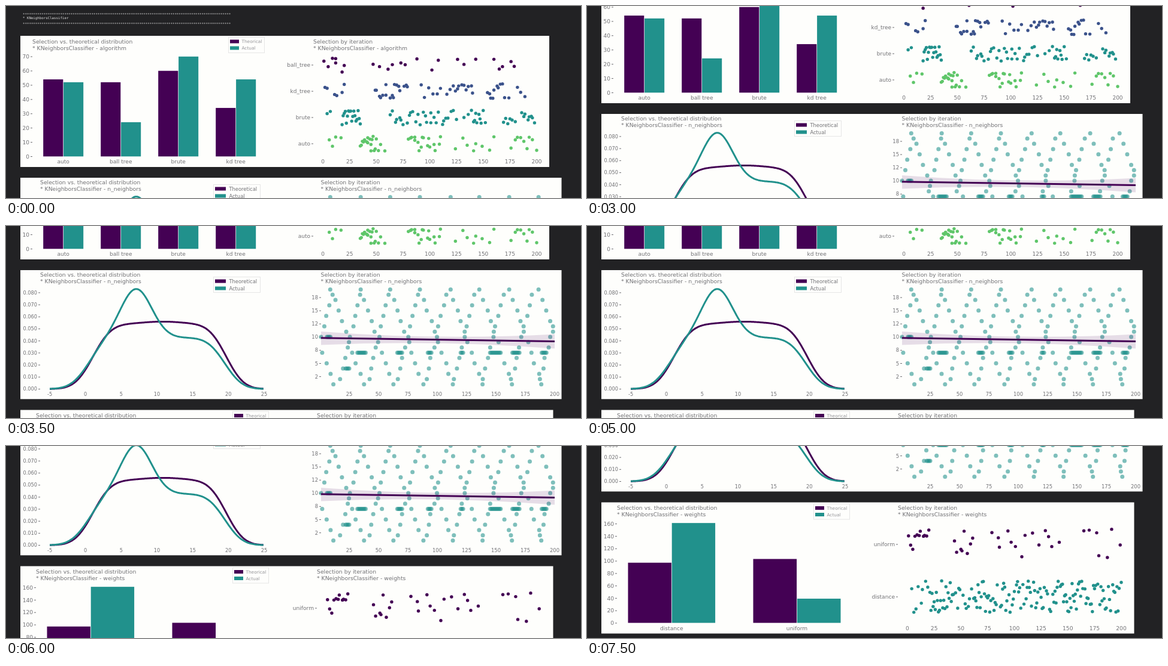
Animation of 960 by 322 pixels, one loop 8000 ms. Source, as an HTML page with a canvas:

```html
<!DOCTYPE html>
<html lang="en">
<head>
<meta charset="utf-8">
<title>Parameter selection report</title>
<style>
  html, body { margin: 0; width: 100%; height: 100%; overflow: hidden; background: #222224; }
  canvas { display: block; }
</style>
</head>
<body>
<canvas id="stage" width="960" height="322"></canvas>
<script>
const ctx = document.getElementById('stage').getContext('2d');
const LOOP = 8000;
const STEP = 107;
const JUMPS = [3000, 3500, 6000, 6500];
const SANS = '"DejaVu Sans", sans-serif';
const MONO = '"DejaVu Sans Mono", monospace';
const PURPLE = '#440154', BLUE = '#3b528b', TEAL = '#21918c', GREEN = '#5fc66a';
const PAPER = '#fefefc', INK = '#707074', FAINT = '#96969a';

function rng(seed) {
  return () => {
    seed = (seed * 1664525 + 1013904223) >>> 0;
    return seed / 4294967296;
  };
}

function rect(x, y, w, h, color) {
  ctx.fillStyle = color;
  ctx.fillRect(x, y, w, h);
}

// y is the middle of the capitals
function label(text, x, y, size, align = 'left', color = INK, font = SANS) {
  ctx.font = `${size}px ${font}`;
  ctx.textAlign = align;
  ctx.fillStyle = color;
  ctx.fillText(text, x, y + size * 0.36);
}

function dot(x, y, r, color) {
  ctx.fillStyle = color;
  ctx.beginPath();
  ctx.arc(x, y, r, 0, Math.PI * 2);
  ctx.fill();
}

// Spreads points over spans of iterations [from, to, count]; returns the iterations used
function scatter(spans, x0, y, spread, color, seed) {
  const rand = rng(seed);
  const used = new Set();
  for (const [from, to, n] of spans) {
    for (let i = 0; i < n; i++) {
      const inner = i > 0 && i < n - 1;
      const pos = i + (inner ? rand() - 0.5 : 0);
      const v = Math.round(from + (to - from) * pos / (n - 1));
      used.add(v);
      dot(x0 + v * 1.785, y + (rand() * 2 - 1) * spread, 2.7, color);
    }
  }
  return used;
}

// Normal distribution function, close approximation
const phi = z => 1 / (1 + Math.exp(-1.5976 * z - 0.07056 * z ** 3));
const bell = (x, mid, s) => Math.exp(-((x - mid) ** 2) / (2 * s * s));
const plateau = (x, from, to) => phi((x - from) / 2) - phi((x - to) / 1.94);
const theory = x => 0.0537 * plateau(x, 1.05, 19.7) + 0.0022 * bell(x, 10.8, 3);
const actual = x => 0.0425 * plateau(x, 0.45, 19.5) + 0.0405 * bell(x, 7.1, 2.17);

function density(f, color) {
  ctx.beginPath();
  for (let x = -5; x <= 25; x += 0.1) ctx.lineTo(132.7 + x * 11.93, 487.3 - f(x) * 2020);
  ctx.strokeStyle = color;
  ctx.lineWidth = 3;
  ctx.stroke();
}

function titles(x, y, name) {
  label('Selection vs. theoretical distribution', x[0], y, 9.27);
  label('Selection by iteration', x[1], y, 9.27);
  for (const left of x) label('* KNeighborsClassifier - ' + name, left, y + 10.7, 9.27);
}

function legend(x, y, w, swatch, gap, size, first, color) {
  ctx.strokeStyle = '#e6e6e6';
  ctx.lineWidth = 1;
  ctx.strokeRect(x + 0.5, y + 0.5, w, 26);
  [[first, PURPLE], ['Actual', TEAL]].forEach(([text, fill], i) => {
    const top = y + 4.5 + i * gap;
    rect(x + 3, top, swatch, 6, fill);
    label(text, x + swatch + size, top + 3, size, 'left', color);
  });
}

function tickY(text, x, y, size) {
  label(text, x - 5, y, size, 'right');
  rect(x - 3, y - 0.5, 3, 1, INK);
}

function ticksX(x0, unit, from, to, by, y, size) {
  for (let v = from; v <= to; v += by) label(v, x0 + v * unit, y, size, 'center');
}

function barPair(name, mid, base, w, unit, left, right) {
  rect(mid - w, base - left * unit, w - 0.4, left * unit, PURPLE);
  rect(mid + 0.4, base - right * unit, w - 0.4, right * unit, TEAL);
  label(name, mid, base + 8.8, 9.1, 'center');
}

function header() {
  const stars = '*'.repeat(100);
  label(stars, 28, 13.5, 5.78, 'left', '#d8d8d8', MONO);
  label('* KNeighborsClassifier', 28, 20.4, 5.78, 'left', '#e4e4e4', MONO);
  label(stars, 28, 29.8, 5.78, 'left', '#d8d8d8', MONO);
}

function algorithmPanel() {
  rect(24, 50, 883, 220, PAPER);
  titles([44, 513], 60, 'algorithm');
  legend(371, 52, 60, 15, 11, 7.4, 'Theorical', FAINT);
  for (let v = 0; v <= 70; v += 10) tickY(v, 44, 252.5 - v * 2.393, 9);
  [['auto', 54, 52], ['ball tree', 52, 24], ['brute', 60, 70], ['kd tree', 34, 54]]
    .forEach(([name, left, right], i) =>
      barPair(name, 95.7 + i * 96, 252.3, 33.5, 2.393, left, right));

  const rows = [
    ['ball_tree', PURPLE, [[1, 20, 7], [47, 77, 6], [88, 143, 6], [160, 179, 5]]],
    ['kd_tree', BLUE, [[2, 20, 6], [49, 79, 17], [92, 116, 7], [119, 140, 11], [154, 168, 9], [170, 189, 5]]],
    ['brute', TEAL, [[4, 7, 2], [18, 35, 18], [63, 89, 13], [91, 120, 14], [122, 136, 4],
      [139, 152, 10], [169, 180, 6], [186, 198, 8]]],
    ['auto', GREEN, [[6, 17, 4], [35, 49, 16], [50, 58, 4], [80, 92, 8], [93, 110, 9],
      [124, 160, 8], [176, 200, 9]]],
  ];
  rows.forEach(([name, color, spans], i) => {
    const y = 99 + i * 44;
    tickY(name, 513, y, 9);
    scatter(spans, 529, y, 12.5, color, 7 + i);
  });
  ticksX(529, 1.785, 0, 200, 25, 261, 9);
}

function neighborsScatter() {
  const rand = rng(5);
  const put = (x, v) => {
    if (x > 525 && x < 917) dot(x, 488.4 - v * 8.84, 3.5, 'rgba(33,145,140,0.58)');
  };
  // Odd values fall from each crest, even values climb from each trough
  for (let i = -1; i < 8; i++) {
    const crest = 542.6 + i * 49.7;
    const trough = 554 + i * 47.7;
    for (let k = 0; k < 10; k++) {
      put(crest + k * 6 + rand() * 3 - 1.5, 19 - 2 * k);
      if (k) put(trough + k * 4.2 + rand() * 3 - 1.5, 2 * k);
    }
  }
  // Favoured values held over spans of iterations
  const runs = [[32, 39, 7], [66, 70, 7], [92, 95, 7], [120, 122, 7], [145, 153, 7],
    [164, 170, 7], [189, 193, 7], [22, 25, 4], [6, 9, 10]];
  for (const [from, to, v] of runs) {
    for (let n = from; n <= to; n++) put(524 + n * 1.96, v);
  }
}

function regression() {
  ctx.fillStyle = 'rgba(68,1,84,0.13)';
  ctx.beginPath();
  ctx.moveTo(526, 391);
  ctx.quadraticCurveTo(721, 406, 916, 395.5);
  ctx.lineTo(916, 419.5);
  ctx.quadraticCurveTo(721, 405, 526, 413.5);
  ctx.fill();
  ctx.strokeStyle = PURPLE;
  ctx.lineWidth = 3;
  ctx.beginPath();
  ctx.moveTo(526, 401.7);
  ctx.lineTo(916, 407.5);
  ctx.stroke();
}

function neighborsPanel() {
  rect(24, 288, 903.5, 216.3, PAPER);
  titles([57, 525.5], 296, 'n_neighbors');
  legend(346, 299, 78, 18, 12, 8.4, 'Theoretical', INK);
  for (let i = 0; i <= 8; i++) tickY((i / 100).toFixed(3), 57, 487.5 - i * 20.2, 8.2);
  ticksX(132.7, 11.93, -5, 25, 5, 496, 8.2);
  density(theory, PURPLE);
  density(actual, TEAL);

  for (let i = 0; i < 7; i++) {
    const v = 17.5 - i * 2.5;
    // Half values round to even, as in the printed ticks
    const shown = v % 1 ? 2 * Math.round(v / 2) : v;
    tickY(shown, 526, 334 + i * 22.1, 8.4);
  }
  ticksX(524, 1.96, 25, 200, 25, 496, 8.4);
  neighborsScatter();
  regression();
}

function weightsPanel() {
  rect(24, 522.5, 889.5, 220, PAPER);
  titles([50, 519], 532, 'weights');
  legend(378, 524.5, 60, 15, 11, 7.4, 'Theorical', FAINT);
  for (let v = 0; v <= 160; v += 20) tickY(v, 50, 725 - v * 1.04, 9.1);
  barPair('distance', 141.3, 724.6, 72.8, 1.04, 97, 161);
  barPair('uniform', 350.5, 724.6, 73, 1.04, 103, 39);
  tickY('uniform', 519, 593, 9.1);
  tickY('distance', 519, 681, 9.1);
  ticksX(535, 1.785, 0, 200, 25, 733.5, 9.1);
  const spans = [[1, 20, 11], [44, 61, 8], [79, 101, 6], [107, 142, 8], [165, 199, 7]];
  const used = scatter(spans, 535, 591, 24, PURPLE, 23);
  // Every iteration that is not uniform is distance
  const rand = rng(41);
  for (let v = 3; v <= 200; v++) {
    if (!used.has(v)) dot(535 + v * 1.785, 654 + rand() * 53, 2.7, TEAL);
  }
}

function render(t) {
  const scroll = STEP * JUMPS.filter(start => t >= start).length;
  rect(0, 0, 960, 322, '#222224');
  ctx.save();
  ctx.translate(0, -scroll);
  header();
  algorithmPanel();
  neighborsPanel();
  weightsPanel();
  ctx.restore();
}

const begin = performance.now();
function tick() {
  render((performance.now() - begin) % LOOP);
  requestAnimationFrame(tick);
}
tick();
</script>
</body>
</html>
```
